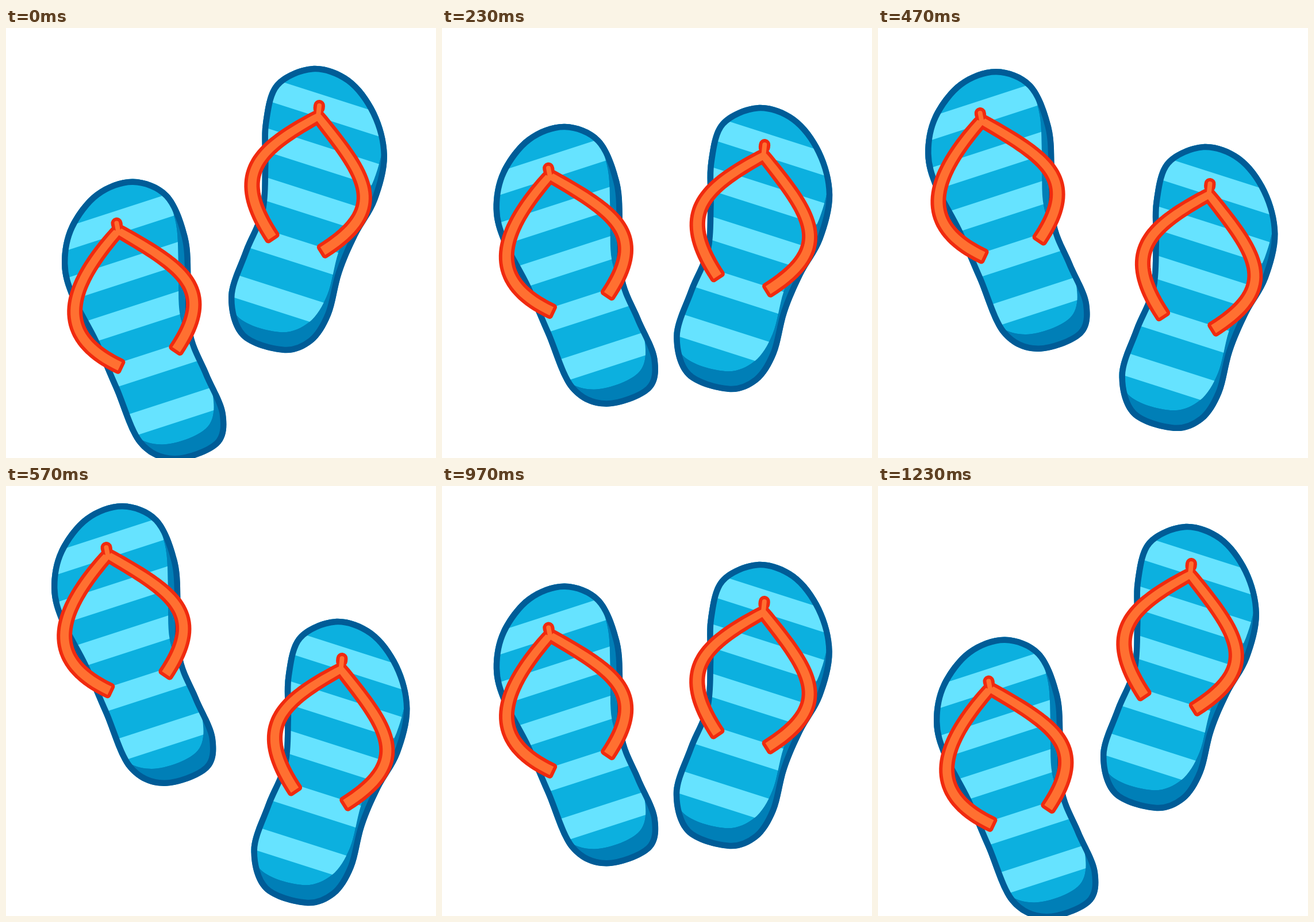
An HTML page with a canvas for the animation above (1.26 s loop, 748x748 px).

```html
<!DOCTYPE html>
<html lang="en">
<head>
<meta charset="utf-8">
<title>Flip-flops</title>
<style>
  html, body { margin: 0; width: 100%; height: 100%; overflow: hidden; background: #fff; }
  canvas { display: block; width: 100vmin; height: 100vmin; }
</style>
</head>
<body>
<canvas width="748" height="748"></canvas>
<script>
const ctx = document.querySelector('canvas').getContext('2d');
const DARK = '#005c97', SIDE = '#007fb7', FACE = '#0cb0df', LIGHT = '#66e3ff';
const RED = '#f02a0f', ORANGE = '#ff7031';
const BAND_TOPS = [77, 166, 252, 343, 438], BAND_HEIGHT = 41;

// Closed smooth curve through a few key points.
function smooth(points) {
  const n = points.length, path = new Path2D();
  const at = i => points[(i + n) % n];
  path.moveTo(...points[0]);
  for (let i = 0; i < n; i++) {
    const [[ax, ay], [bx, by], [cx, cy], [dx, dy]] = [at(i - 1), at(i), at(i + 1), at(i + 2)];
    path.bezierCurveTo(bx + (cx - ax) / 6, by + (cy - ay) / 6,
      cx - (dx - bx) / 6, cy - (dy - by) / 6, cx, cy);
  }
  return path;
}

const mix = (a, b, t) => a.map((v, i) => v + (b[i] - v) * t);

// Ribbon along a cubic curve that widens away from its start.
function ribbon(a, b, c, d) {
  const path = new Path2D(), near = [], far = [];
  for (let i = 0; i <= 40; i++) {
    const t = i / 40, bc = mix(b, c, t);
    const p = mix(mix(a, b, t), bc, t), q = mix(bc, mix(c, d, t), t);
    const [x, y] = mix(p, q, t), dx = q[0] - p[0], dy = q[1] - p[1];
    const k = (6 + 2 * Math.sqrt(t)) / Math.hypot(dx, dy);
    near.push([x - dy * k, y + dx * k]);
    far.unshift([x + dy * k, y - dx * k]);
  }
  for (const p of near.concat(far)) path.lineTo(...p);
  path.closePath();
  return path;
}

// `lift` is how far the top face sits from the bottom of the sole.
const left = {
  rest: [18, 232.5], move: [-18, -232.5],
  stripes: [200, 0], slope: -0.325, lift: [-22, -30],
  sole: smooth([[203, 30], [265, 56], [298, 130], [304, 210], [307, 298], [335, 368], [364, 438],
    [352, 494], [275, 522], [212, 492], [169, 395], [133, 313], [94, 238], [79, 178], [92, 112],
    [138, 53]]),
  apex: [177, 120], knob: [174.5, 107],
  arms: [[[91, 217], [62, 300], [180, 356]], [[292, 186], [348, 222], [278, 327]]]
};

const right = {
  rest: [0, 0], move: [39.5, 165],
  stripes: [525, 31], slope: 0.32, lift: [-6, -36],
  sole: smooth([[533, 66], [598, 87], [644, 146], [663, 222], [646, 300], [611, 363], [584, 427],
    [565, 500], [533, 548], [482, 565], [409, 538], [387, 468], [412, 389], [441, 318], [446, 240],
    [447, 165], [468, 96]]),
  apex: [543, 154], knob: [545, 135],
  arms: [[[436, 212], [391, 255], [463, 364]], [[624, 256], [670, 313], [551, 388]]]
};

for (const sandal of [left, right]) {
  sandal.strap = new Path2D();
  for (const arm of sandal.arms) sandal.strap.addPath(ribbon(sandal.apex, ...arm));
}

function drawSole({ sole, lift, stripes, slope }) {
  ctx.save();
  ctx.clip(sole);
  ctx.fillStyle = SIDE;
  ctx.fill(sole);

  ctx.save();
  ctx.translate(...lift);
  ctx.clip(sole);
  ctx.fillStyle = FACE;
  ctx.fill(sole);
  ctx.translate(-lift[0], -lift[1]);
  ctx.transform(1, slope, 0, 1, ...stripes);
  ctx.fillStyle = LIGHT;
  for (const top of BAND_TOPS) ctx.fillRect(-300, top, 600, BAND_HEIGHT);
  ctx.restore();

  ctx.strokeStyle = DARK;
  ctx.lineWidth = 21;
  ctx.stroke(sole);
  ctx.restore();
}

function line(from, to, color, width) {
  ctx.strokeStyle = color;
  ctx.lineWidth = width;
  ctx.beginPath();
  ctx.moveTo(...from);
  ctx.lineTo(...to);
  ctx.stroke();
}

function drawStrap({ strap, knob, apex }) {
  ctx.lineJoin = ctx.lineCap = 'round';
  ctx.strokeStyle = RED;
  ctx.lineWidth = 12;
  ctx.stroke(strap);
  ctx.fillStyle = ORANGE;
  ctx.fill(strap);
  line(knob, mix(knob, apex, 0.25), RED, 20);
  line(knob, apex, ORANGE, 8);
}

function drawSandal(sandal, progress) {
  const { rest, move } = sandal;
  ctx.save();
  ctx.translate(rest[0] + move[0] * progress, rest[1] + move[1] * progress);
  drawSole(sandal);
  drawStrap(sandal);
  ctx.restore();
}

function render() {
  // 30 steps a second: 17 steps out, 20 steps back, one step at rest.
  const step = Math.floor((performance.now() % 1260 + 4) * 0.03);
  const progress = step < 17 ? step / 17 : (37 - step) / 20;
  ctx.fillStyle = '#fff';
  ctx.fillRect(0, 0, 748, 748);
  drawSandal(left, progress);
  drawSandal(right, progress);
  requestAnimationFrame(render);
}
render();
</script>
</body>
</html>
```
